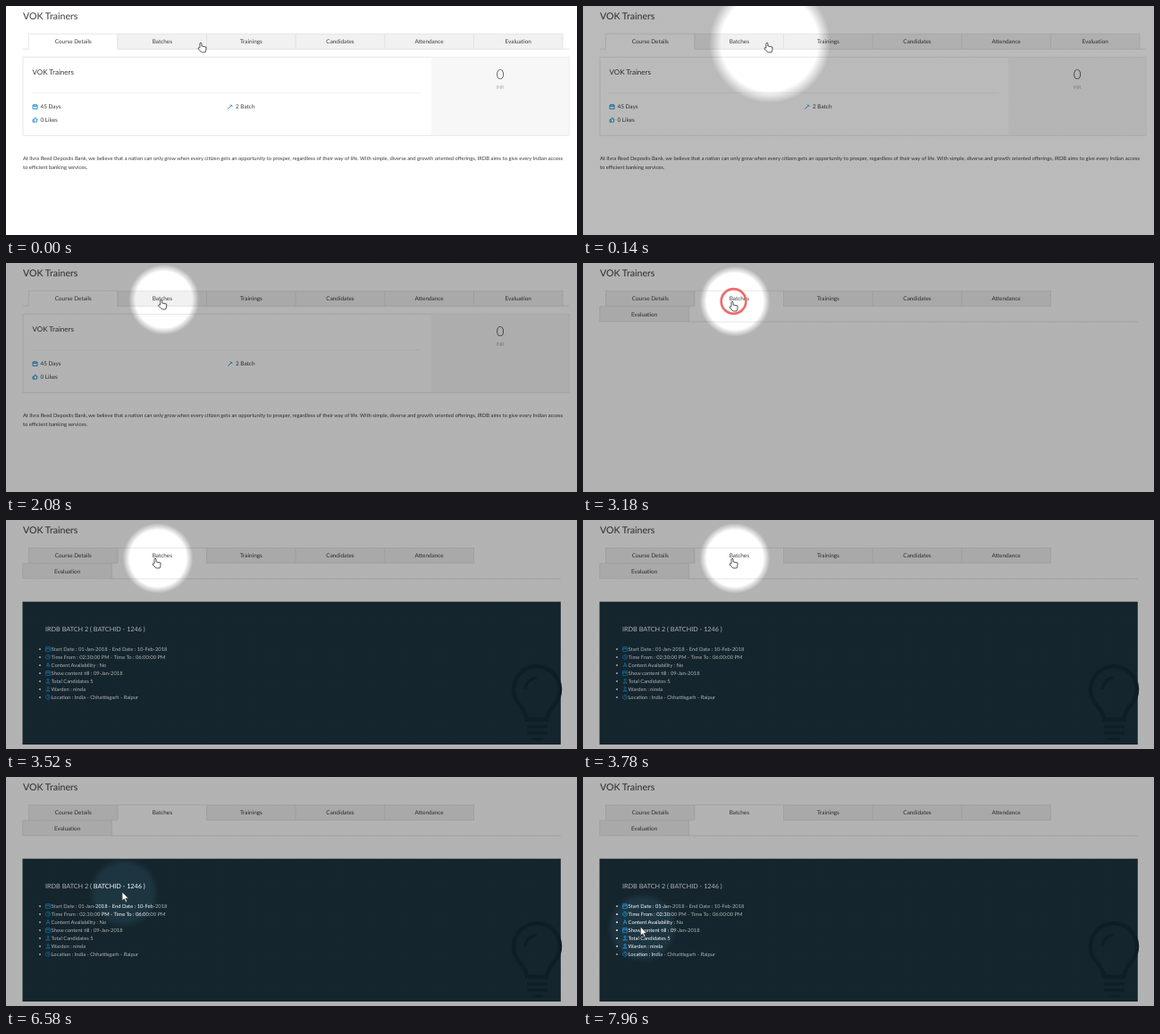
Recreate the animation shown at these times as an HTML page. Size 639 by 257 pixels, loop 8000 ms.

```html
<!DOCTYPE html>
<html lang="en">
<head>
<meta charset="utf-8">
<title>Course page tour</title>
<style>
html, body { margin: 0; width: 100%; height: 100%; overflow: hidden; background: #fff; }
svg { display: block; }
text { font-family: Lato, sans-serif; fill: #3c3c3c; text-rendering: geometricPrecision; }
.middle { text-anchor: middle; }
.light { font-weight: 300; }
.pale { fill: #aaa; }
.white { fill: #fff; }
.icon { fill: none; stroke: #1e8fd0; stroke-width: .9; }
</style>
</head>
<body>
<svg id="stage" width="639" height="257"></svg>
<script>
const stage = document.getElementById("stage");
const LOOP = 8000;
const BORDER = "#e2e2e2";

const text = (x, y, size, content, style = "") =>
  `<text x="${x}" y="${y}" font-size="${size}" class="${style}">${content}</text>`;
const rect = (x, y, w, h, fill, stroke = "none") =>
  `<rect x="${x}" y="${y}" width="${w}" height="${h}" fill="${fill}" stroke="${stroke}" stroke-width=".8"/>`;
const line = (x1, x2, y, color = BORDER) => `<path d="M${x1} ${y}H${x2}" stroke="${color}" stroke-width=".9"/>`;

// Small icons, drawn in a 6 by 6 box.
const shapes = {
  calendar: "M.5 1H5.5V5.5H.5ZM.5 2.7H5.5M2 0V1.5M4 0V1.5",
  wand: "M.3 5.7L4 2M3 .5L5.5 3M4 2L5 1",
  thumb: "M.5 2.7H1.7V5.5H.5ZM1.7 2.8L3 .5Q4 .5 3.6 2.3H5.5L4.8 5.5H1.7",
  clock: "M3 .5A2.5 2.5 0 1 1 2.99 .5M3 1.6V3.2H4.4",
  letter: "M1 5.5L3 .5L5 5.5M1.8 3.8H4.2",
  person: "M3 .7A1 1 0 1 1 2.99 .7M.7 5.2Q3 2.8 5.3 5.2Z",
};
const icon = (x, y, name) => `<path class="icon" transform="translate(${x} ${y})" d="${shapes[name]}"/>`;
const iconLabel = (x, y, name, label) => icon(x, y - 5, name) + text(x + 9, y, 6.4, label);

// The active tab is white and open at the bottom.
const TAB = 99.6;
function tab(label, x, y, active) {
  const body = active
    ? rect(x, y, TAB, 18, "#fff") + `<path d="M${x} ${y + 17}v-17h${TAB}v17" fill="none" stroke="${BORDER}" stroke-width=".8"/>`
    : rect(x, y, TAB, 17, "#f1f1f1", BORDER);
  return body + text(x + TAB / 2, y + 10.8, 6.4, label, "middle");
}
const labels = ["Course Details", "Batches", "Trainings", "Candidates", "Attendance", "Evaluation"];
const tabRow = (count, active) =>
  labels.slice(0, count).map((label, i) => tab(label, 25.4 + i * TAB, 31.3, i === active)).join("");

const details = line(19, 630, 48.3) + tabRow(6, 0) +
  rect(19, 57.3, 611, 88, "#fff", BORDER) + rect(476, 57.7, 153.6, 87.2, "#f7f7f7") +
  text(29.5, 76.5, 8, "VOK Trainers") + line(29, 465, 97.5, "#f0f0f0") +
  text(553, 82, 15, "0", "middle light") + text(553, 93, 5.4, "INR", "middle pale") +
  iconLabel(29.5, 115, "calendar", "45 Days") +
  iconLabel(29.5, 129.7, "thumb", "0 Likes") +
  iconLabel(248, 115, "wand", "2 Batch") +
  text(19, 173, 5.8, "At Ilvra Reed Deposits Bank, we believe that a nation can only grow when every citizen gets an opportunity to prosper, regardless of their way of life. With simple, diverse and growth oriented offerings, IRDB aims to give every Indian access") +
  text(19, 183, 5.8, "to efficient banking services.");

const batchTabs = line(118, 621, 66) + tabRow(5, 1) + tab(labels[5], 18.8, 48.7, false);

const facts = [
  ["calendar", "Start Date : 01-Jan-2018 - End Date : 10-Feb-2018"],
  ["clock", "Time From : 02:30:00 PM - Time To : 06:00:00 PM"],
  ["letter", "Content Availability : No"],
  ["calendar", "Show content till : 09-Jan-2018"],
  ["person", "Total Candidates 5"],
  ["person", "Warden : nirela"],
  ["clock", "Location : India - Chhattisgarh - Raipur"],
];
const bulb = `<g fill="none" stroke="#152a34" stroke-width="4.5">
  <path d="M583 224Q582 216 575 208A26 26 0 1 1 613 208Q606 216 605 224Z"/>
  <path d="M581 190A14 14 0 0 1 594 177M583 232H606M583 239H606M588 246H601" stroke-width="3"/></g>`;
const panel = rect(18.5, 91.7, 602.3, 160.3, "#1d3541") + bulb +
  text(44, 125, 7.25, "IRDB BATCH 2 ( BATCHID - 1246 )", "white") +
  facts.map(([name, label], i) => {
    const y = 147 + i * 9;
    return `<circle cx="38" cy="${y - 2}" r=".9" fill="#fff"/>` + icon(44, y - 5.2, name) + text(50.6, y, 5.8, label, "white");
  }).join("");

stage.innerHTML = `
  <defs><radialGradient id="spot" gradientUnits="userSpaceOnUse">
    <stop offset=".8" stop-opacity="0"/><stop offset="1" stop-opacity=".3"/>
  </radialGradient></defs>
  ${rect(0, 0, 639, 257, "#fff")}
  ${text(19, 14.8, 10.6, "VOK Trainers")}
  <g id="details">${details}</g>
  <g id="batchTabs">${batchTabs}</g>
  <g id="panel">${panel}</g>
  <rect id="dim" width="639" height="257" fill="url(#spot)"/>
  <circle id="ring" fill="none" stroke="#f06a6a" stroke-width="2.6"/>
  <g id="cursor" fill="#fff" stroke="#333" stroke-width=".8" stroke-linejoin="round">
    <path id="hand" d="M-2 7V2Q-1 0 0 2V5L5 6V9L4 12H0L-4 8Q-4 6-2 7Z"/>
    <path id="arrow" d="M0 0V10L2.4 7.8L4 11.5L5.6 10.8L4 7.2H7.2Z"/>
  </g>`;
const part = id => document.getElementById(id);

// Turning points of the pointer: time, x, y.
const path = [[0, 219, 40], [140, 207, 40], [1170, 141, 43], [1700, 198, 40], [2630, 141, 40], [2920, 168, 42],
  [3910, 168, 42], [4430, 179, 51], [5150, 46, 130], [5410, 50, 128], [6640, 134, 129], [7450, 68, 143], [LOOP, 64, 170]];

function pointerAt(t) {
  const i = path.findIndex(([end]) => end > t);
  const [t0, x0, y0] = path[i - 1], [t1, x1, y1] = path[i];
  const p = (t - t0) / (t1 - t0);
  return [x0 + (x1 - x0) * p, y0 + (y1 - y0) * p];
}
const show = (id, on) => part(id).setAttribute("visibility", on ? "visible" : "hidden");
const set = (id, attrs) => Object.entries(attrs).forEach(([k, v]) => part(id).setAttribute(k, v));

const CLICK = 2920, TABS = 3050, PANEL = 3520, ARROW = 4230;

function draw(now) {
  const t = now % LOOP;
  const [x, y] = pointerAt(t);

  show("details", t < TABS);
  show("batchTabs", t >= TABS);
  show("panel", t >= PANEL);
  show("dim", t >= 20);
  show("ring", t >= CLICK && t < PANEL);
  show("hand", t < ARROW);
  show("arrow", t >= ARROW);

  set("spot", { cx: x + 2, cy: y + 1, r: 39.5 + Math.max(0, 290 - t) * .19 });
  set("dim", { opacity: Math.min(1, .3 + t / 235) });
  set("ring", { cx: x + .5, cy: y + 1, r: Math.min(14, 6 + (t - CLICK) * .03) });
  set("cursor", { transform: `translate(${x} ${y})` });
  requestAnimationFrame(draw);
}
draw(0);
</script>
</body>
</html>
```
